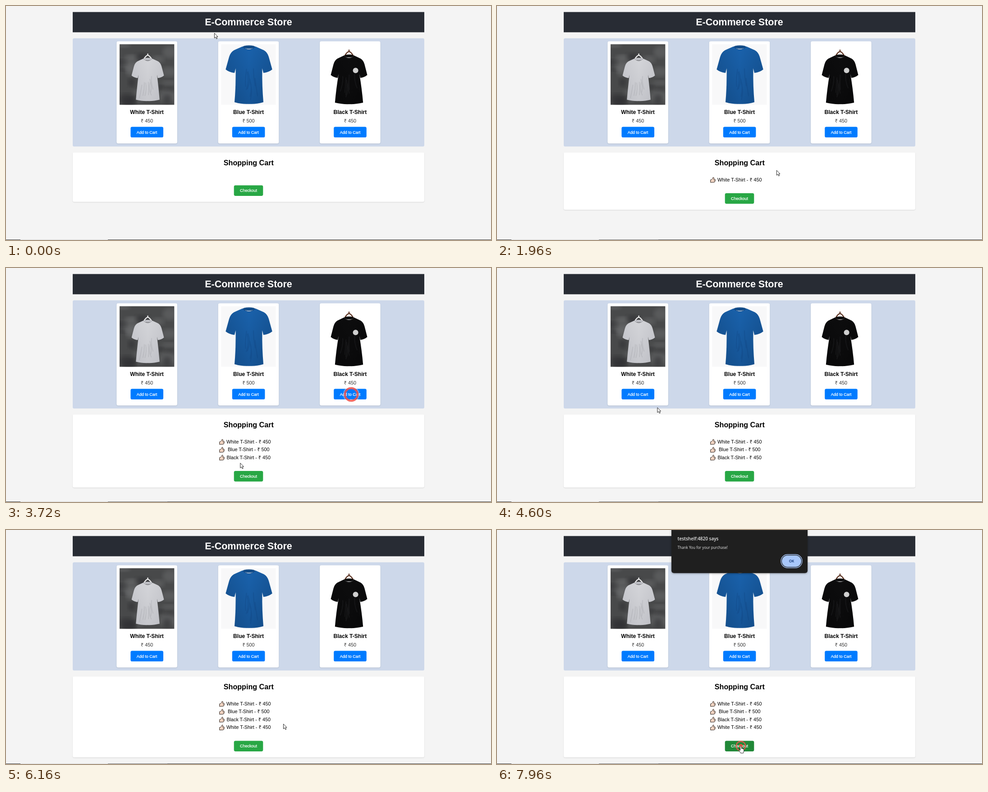
Recreate the animation shown at these times as an HTML page. Size 1076 by 520 pixels, loop 8000 ms.

```html
<!DOCTYPE html>
<html lang="en">
<head>
<meta charset="utf-8">
<title>Store</title>
<style>
  html, body { margin: 0; width: 100%; height: 100%; overflow: hidden; background: #f4f4f4; }
  svg { display: block; }
  text { font: 10.75px "Liberation Sans", Arial, sans-serif; text-anchor: middle; fill: #000; }
  .panel { fill: #fff; filter: drop-shadow(0 1.2px 1.3px rgba(0, 0, 0, .12)); }
  .title { font-size: 21.5px; font-weight: bold; fill: #fff; }
  .heading { font-size: 16.13px; font-weight: bold; }
  .name { font-size: 12.1px; font-weight: bold; }
  .price { fill: #333; }
  .label { font-size: 9px; fill: #fff; stroke: #fff; stroke-width: .25; }
  .buy { fill: #007bff; }
  .buy.hot { fill: #0056b3; }
  .pay { fill: #28a745; }
  .pay.hot { fill: #218838; }
  .dialog > path { fill: #1f1f1f; filter: drop-shadow(0 1px 2px rgba(0, 0, 0, .35)); }
  .dialog text { font: 8.16px "Open Sans", "Noto Sans", sans-serif; fill: #e8e8e8; text-anchor: start; }
  .dialog .host { font-size: 10px; font-weight: 600; }
  .dialog .ok { font-weight: 600; fill: #062e6f; text-anchor: middle; }
  .line { fill: none; vector-effect: non-scaling-stroke; stroke-linecap: round; }
</style>
</head>
<body>
<svg width="1076" height="520" viewBox="0 0 1076 520">
  <defs>
    <g id="thumb" stroke="#2b211c" stroke-linejoin="round">
      <path fill="#f3d6c4" d="M.7 6.2 3 5.6Q5.6 3.6 6 1 7.8-.2 8.3 1.6 8.4 3.2 7.6 4.8H10.4Q11.8 5.2 11.2 6.8 11 10 10 10.4 9.8 11.6 8.4 11.6L.7 11.8Z"/>
      <path fill="none" stroke-width=".5" d="M8 7H11M8 9H10.6"/>
    </g>
    <filter id="soft"><feGaussianBlur stdDeviation="5"/></filter>
    <clipPath id="frame"><rect x="252" y="85" width="121.3" height="134.5"/></clipPath>
  </defs>

  <rect width="1076" height="520" fill="#f4f4f4"/>
  <rect x="148" y="13.4" width="780" height="45" fill="#282c34"/>
  <text class="title" x="538" y="43">E-Commerce Store</text>
  <rect x="148" y="71.7" width="780" height="240.6" rx="3.4" fill="#cdd8ea"/>

  <g id="cards"></g>
  <rect x="252" y="85" width="121.3" height="134.5" fill="#48494a"/>
  <g id="wall" clip-path="url(#frame)"></g>
  <rect x="477.3" y="85" width="121.3" height="134.5" fill="#f8f8f9"/>
  <g id="shirts"></g>
  <circle cx="775.6" cy="143.3" r="6" fill="#cfcfcf"/>

  <rect id="cart" class="panel" x="148" y="325.6" width="780" rx="3.4"/>
  <text class="heading" x="538.3" y="354">Shopping Cart</text>
  <g id="items"></g>
  <g id="checkout">
    <rect class="pay" x="505.7" y="398.4" width="64.6" height="23.5" rx="3.4"/>
    <text class="label" x="538" y="413.3">Checkout</text>
  </g>

  <rect y="519" width="1076" height="1" fill="#3c3c3e"/>
  <rect x="32" y="519" width="194" height="1" fill="#d8d8d8"/>
  <rect id="tab" x="226" y="519" width="132" height="1" fill="#6c6c6e"/>

  <g id="dialog" class="dialog">
    <path d="M387-10H689V90Q689 95.700 683 95.700H393Q387 95.700 387 90Z"/>
    <text class="host" x="400.5" y="22.8">testshelf:4820 says</text>
    <text x="400.5" y="42.3">Thank You for your purchase!</text>
    <rect x="630" y="54.5" width="47" height="29.5" rx="14.7" fill="none" stroke="#a8c7fa" stroke-width="1.3"/>
    <rect x="632" y="56.5" width="43" height="25.5" rx="12.7" fill="#a8c7fa"/>
    <text class="ok" x="653.5" y="72.3">OK</text>
  </g>

  <g id="ripple">
    <circle id="halo" fill="none" stroke="#fff"/>
    <circle id="ring" fill="none" stroke="#f0524b"/>
    <circle id="dot" r="4" fill="#f4513f"/>
  </g>
  <g id="cursor" stroke="#111" stroke-width=".9" fill="#fff" stroke-linejoin="round">
    <path id="arrow" d="M.4.4V11.4L3 9 4.800 13 6.700 12.200 5 8.300H8Z"/>
    <path id="hand" d="M-1.400 1Q0-2 1.400 1V5.500Q2.700 4.700 3.300 6 4.700 5.300 5.100 6.700 6.800 6.200 6.800 8V11.500L5.600 15.800H-.5L-4 10Q-4.500 7-1.400 9.600Z"/>
  </g>
</svg>
<script>
const LOOP = 8000, STEP = 40, ROW = 17.5, RIPPLE = 265;
const $ = id => document.getElementById(id);
const set = (el, attrs) => { for (const k in attrs) el.setAttribute(k, attrs[k]); };
const show = (el, on) => { el.style.display = on ? '' : 'none'; };
const clamp = v => Math.max(0, Math.min(1, v));

const products = [['White', 450], ['Blue', 500], ['Black', 450]];
const order = [0, 1, 2, 0];

// Button press and start of its ripple; the last press is the checkout
const clicks = [[1400, 1560], [2400, 2540], [3240, 3560], [4800, 4980], [7840, 7860]];
const adds = clicks.slice(0, -1), checkoutAt = clicks[4][0];

// Pointer trips: start, end, to, and an optional control point for a bow
const home = [462, 60];
const trips = [
  { t: [40, 840], to: [320, 282] },
  { t: [1520, 2360], to: [532, 282], bow: [814, 518] },
  { t: [2520, 3200], to: [766, 281], bow: [618, 422] },
  { t: [3480, 4160], to: [500, 440], bow: [444, 483] },
  { t: [4360, 4760], to: [328, 285] },
  { t: [4960, 5800], to: [540, 476], bow: [653, 358] },
  { t: [5840, 6200], to: [616, 430] },
  { t: [6400, 6720], to: [560, 190], bow: [780, 300] },
  { t: [6720, 7200], to: [552, 440], bow: [180, 260] },
  { t: [7240, 7320], to: [545, 491] },
  { t: [7360, 7560], to: [541, 480] }
];

function pointer(t) {
  let from = home;
  for (const { t: [start, end], to, bow } of trips) {
    if (t < start) break;
    if (t < end) {
      const u = 1 - (1 - (t - start) / (end - start)) ** 2;
      return from.map((a, k) => {
        const mid = bow ? bow[k] : (a + to[k]) / 2;
        return (1 - u) ** 2 * a + 2 * u * (1 - u) * mid + u * u * to[k];
      });
    }
    from = to;
  }
  return from;
}

let seed = 7;
const rand = () => (seed = seed * 16807 % 2147483647) / 2147483647;

// One half in unit space, mirrored; sizes are half the sleeve span and the height
function shirt({ x, y, w, h, body, light, dark, fold, hanger }) {
  const half = `M-.02.05Q.16.05.28 0L.64.065Q.79.1.85.18L1 .4Q.85.45.62.46L.57.38Q${body - .06}.7 ${body}.97Q.3 1.010-.02 1Z`;
  const id = 'dye' + x;
  let folds = '';
  for (let i = 0; i < 7; i++) {
    const a = (rand() - .5) * body, b = .35 + rand() * .3;
    folds += `M${a} ${b}Q${a + (rand() - .5) * .3} ${b + .15} ${a * 1.4} ${b + .3}`;
  }
  const hook = hanger ? `<path class="line" stroke="${hanger}" stroke-width="2.5" d="M-.26.02Q-.1-.08 0-.08T.26.02M0-.08V-.11"/>` : '';
  return `
    <linearGradient id="${id}" x2=".8" y2="1"><stop stop-color="${light}"/><stop offset="1" stop-color="${dark}"/></linearGradient>
    <g transform="translate(${x} ${y}) scale(${w} ${h})">
      ${hook}
      <ellipse cy=".01" rx=".27" ry=".03" fill="${dark}"/>
      <path d="${half}" fill="url(#${id})"/>
      <path d="${half}" fill="url(#${id})" transform="scale(-1 1)"/>
      <path class="line" d="${folds}" stroke="${fold}" stroke-width="2" opacity=".18"/>
      <path class="line" d="M-.28.005Q0 .11.28.005" stroke="${fold}" stroke-width="1" opacity=".5"/>
    </g>`;
}

$('shirts').innerHTML = [
  { x: 314.5, y: 117, w: 36, h: 94, body: .73, light: '#d4d5d9', dark: '#bfc0c6', fold: '#85868c', hanger: '#e8e8e8' },
  { x: 539, y: 90, w: 51.7, h: 127.5, body: .62, light: '#1a62ac', dark: '#134c88', fold: '#0c356a' },
  { x: 761, y: 110, w: 40.5, h: 108, body: .77, light: '#0d0d0e', dark: '#080809', fold: '#45464a', hanger: '#5e3524' }
].map(shirt).join('');

for (let i = 0; i < 26; i++) {
  const shade = rand() < .5 ? '#6c6d6e' : '#2b2c2d';
  $('wall').innerHTML += `<ellipse cx="${252 + rand() * 121}" cy="${85 + rand() * 134}"
    rx="${6 + rand() * 14}" ry="${5 + rand() * 10}" fill="${shade}" opacity=".5" filter="url(#soft)"/>`;
}

$('cards').innerHTML = products.map(([name, price], i) => {
  const x = 312.6 + i * 225.4;
  return `
  <rect class="panel" x="${x - 67.2}" y="78.5" width="134.4" height="227" rx="3.4"/>
  <text class="name" x="${x}" y="240">${name} T-Shirt</text>
  <text class="price" x="${x}" y="259.3">₹ ${price}</text>
  <rect class="buy" x="${x - 36.2}" y="268.5" width="72.6" height="23.6" rx="3.4"/>
  <text class="label" x="${x}" y="283.7">Add to Cart</text>`;
}).join('');

$('items').innerHTML = order.map((p, i) => `
  <g transform="translate(0 ${i * ROW})"><use href="#thumb" x="473" y="380.2"/>
  <text x="538.2" y="389.8">${products[p][0]} T-Shirt - ₹ ${products[p][1]}</text></g>`).join('');

const buttons = [...document.querySelectorAll('.buy, .pay')];
const rows = [...$('items').children];

function inside(el, x, y) {
  const b = el.getBoundingClientRect();
  return x >= b.left && x <= b.right && y >= b.top && y <= b.bottom;
}

function drawRipple(t) {
  const click = clicks.find(c => t >= c[1] && t < c[1] + RIPPLE);
  show($('ripple'), click);
  if (!click) return;
  const age = t - click[1], r = 4 + age * .063;
  const fade = .85 * clamp((RIPPLE - age) / 105);
  const width = Math.max(1.8, 4.5 - Math.abs(age - 160) * .035);
  set($('ripple'), { transform: `translate(${pointer(click[0])})` });
  set($('ring'), { r, 'stroke-width': width, opacity: fade });
  set($('halo'), { r: r + width / 2 + 1, 'stroke-width': 1.2, opacity: age > 120 ? fade * .6 : 0 });
  set($('dot'), { opacity: clamp((150 - age) / 50) });
}

function draw(t) {
  const count = adds.filter(c => t >= c[0]).length, grow = count * ROW;
  rows.forEach((row, i) => show(row, i < count));
  set($('cart'), { height: 109.6 + grow });
  set($('checkout'), { transform: `translate(0 ${grow})` });
  show($('tab'), count > 0);

  const [x, y] = pointer(t);
  const hovered = buttons.find(b => inside(b, x, y));
  buttons.forEach(b => b.classList.toggle('hot', b === hovered));
  set($('cursor'), { transform: `translate(${x} ${y})` });
  show($('hand'), hovered);
  show($('arrow'), !hovered);

  drawRipple(t);
  $('dialog').style.opacity = t < checkoutAt ? 0 : clamp(.5 + (t - checkoutAt) / 80);
}

const start = performance.now();
function tick() {
  const t = (performance.now() - start) % LOOP;
  draw(Math.floor(t / STEP) * STEP);
  requestAnimationFrame(tick);
}
tick();
</script>
</body>
</html>
```
